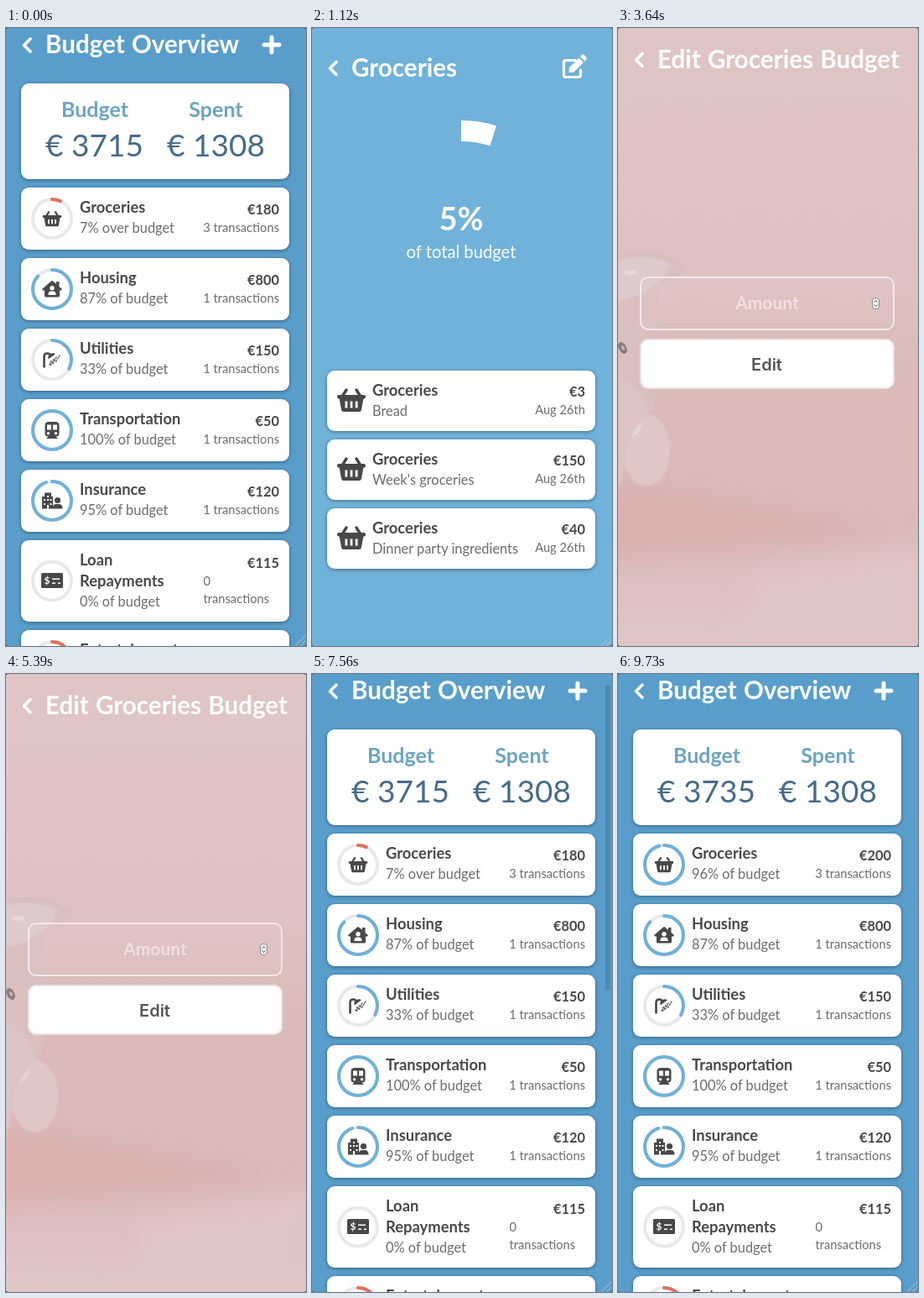
An HTML page that plays this animation: 358x736 px, repeating every 9800 ms.

```html
<!DOCTYPE html>
<html lang="en">
<head>
<meta charset="utf-8">
<title>Budget</title>
<style>
  html, body { margin: 0; width: 100%; height: 100%; overflow: hidden; background: #4b5a66; }
  svg { display: block; width: 358px; height: 736px; border-radius: 3px; }
  text { font-family: Lato, "Open Sans", sans-serif; }
  .title { font-size: 29.6px; font-weight: 700; fill: #fff; word-spacing: 1px; }
  .head { font-size: 25px; font-weight: 700; fill: #6ba4c3; }
  .sum { font-size: 37px; fill: #466b8b; }
  .name { font-size: 18.4px; font-weight: 700; fill: #484848; }
  .sub { font-size: 16.4px; fill: #6c6c6c; }
  .amt { font-size: 16.4px; font-weight: 700; fill: #484848; }
  .note { font-size: 14.7px; fill: #6c6c6c; }
  .pct { font-size: 38px; font-weight: 700; fill: #fff; }
  .total { font-size: 20.2px; fill: #fff; }
  .field { font-size: 21px; font-weight: 700; fill: #fff; }
  .btn { font: 600 20px Inter, sans-serif; fill: #565656; }
  .mid { text-anchor: middle; }
  .end { text-anchor: end; }
  .card { fill: #fff; filter: drop-shadow(0 1px 2px rgba(0, 0, 0, .4)); }
  .line { fill: none; stroke-linecap: round; stroke-linejoin: round; }
  .ring { fill: none; stroke-width: 4; }
  .icon { fill: #484848; stroke: none; }
  .icon .s { fill: none; stroke: #484848; stroke-linecap: round; }
  .icon .w { fill: #fff; }
</style>
</head>
<body>
<svg id="stage" viewBox="0 0 358 736" xmlns="http://www.w3.org/2000/svg"></svg>
<script>
const LOOP = 9800;
const BLUE = '#70b1d8', RED = '#e0705c';

const text = (x, y, cls, str, id = '') =>
  `<text x="${x}" y="${y}" class="${cls}"${id && ` id="${id}"`}>${str}</text>`;
const rect = (x, y, w, h, rx = 0, attrs = '') =>
  `<rect x="${x}" y="${y}" width="${w}" height="${h}" rx="${rx}" ${attrs}/>`;
const card = (y, h) => rect(18, y, 320, h, 9, 'class="card"');
const line = (d, width, color = '#fff') =>
  `<path class="line" d="${d}" stroke="${color}" stroke-width="${width}"/>`;
const icon = (name, x, y, scale = 1) =>
  `<g class="icon" transform="translate(${x} ${y}) scale(${scale})">${icons[name]}</g>`;
const header = (y, title) =>
  line(`M29 ${y - 7}l-7.5 7.5 7.5 7.5`, 3.6) + text(47, y + 10, 'title', title);
const grip = line('M346 735l11-11M352 735l5-5', 1, '#b9c3ca');

const icons = {
  basket: `<path class="s" stroke-width="3.4" d="M-6-12l-5 8M6-12l5 8"/>
    <rect x="-17" y="-6" width="34" height="4.6" rx="2"/>
    <path d="M-14.5-2h29l-2.6 14q-.4 2-2.4 2h-19q-2 0-2.4-2z"/>
    <path class="w" d="M-7.5 1.5h2.8v8h-2.8zM-1.4 1.5h2.8v8h-2.8zM4.7 1.5h2.8v8h-2.8z"/>`,
  house: `<path d="M-12 0L-1-9.6q1-.8 2 0L5-6.2V-9h3.5v6L12 0l-1 1.6H9V8q0 1.5-1.5 1.5h-15Q-9 9.5-9 8V1.6h-2z"/>
    <circle class="w" cy="-1.2" r="2.7"/><path class="w" d="M-4.6 7q0-4.4 3.4-4.4h2.4Q4.6 2.6 4.6 7z"/>`,
  shower: `<path class="s" stroke-width="2.6" d="M-9.5 8.5v-12q0-4 3.7-4 2.6 0 3.6 2.4"/>
    <path d="M-4.5-.5q-1-5 3-6.8 3-1.2 5.5.5z"/>
    <path class="s" stroke-width="1.3" stroke-dasharray="1.6 1.8" d="M-1 1.5L-3 6M2-.5l-3.5 7M5-3L1 5M9-5L4 3"/>`,
  train: `<path d="M-8.5-6q0-4 5-4h7q5 0 5 4V4q0 3.5-4 3.5L7 10H-7l2.5-2.5q-4 0-4-3.5z"/>
    <path class="w" d="M-6-6.5h5v6h-5zM1-6.5h5v6H1z"/>
    <circle class="w" cx="-4.5" cy="3.7" r="1.7"/><circle class="w" cx="4.5" cy="3.7" r="1.7"/>`,
  office: `<path d="M-12-5h3v-4.5h8V-5h2V9.5h-13z"/>
    <path class="w" d="M-10-2h2v2h-2zM-6-6h2v2h-2zM-6-2h2v2h-2zM-2.5-2h2v2h-2zM-10 3h2v2h-2zM-2.5 3h2v2h-2zM-6 5h2v4.5h-2z"/>
    <circle cx="6.5" cy="-.5" r="3.6"/><path d="M.5 9.5q0-5.5 4.5-5.5h3q4.5 0 4.5 5.5z"/>`,
  check: `<rect x="-13" y="-9" width="26" height="18" rx="1.5"/>
    <path class="w" d="M0-2.5H9v1.5H0zM0 2.5H4v1.5H0zM7 2.5h3v1.5H7z"/>
    <text class="w" x="-9.5" y="4" font-size="12" font-weight="700">$</text>`
};

const ring = (y, value, color, id = '') => {
  const at = `class="ring" cx="55" cy="${y}" r="23"`;
  return `<circle ${at} stroke="#e9e9e9"/>` + (value ? `<circle ${at} id="${id}" pathLength="100"
    stroke="${color}" stroke-linecap="round" stroke-dasharray="100"
    stroke-dashoffset="${100 - value}" transform="rotate(-90 55 ${y})"/>` : '');
};

const row = (y, symbol, scale, name, value, sub, amount, count, id = '') =>
  card(y, 74) + ring(y + 37, value, id ? RED : BLUE, id && id + 'Ring') +
  icon(symbol, 55, y + 37, scale) +
  text(88, y + 30, 'name', name) + text(88, y + 54, 'sub', sub, id && id + 'Sub') +
  text(326, y + 32, 'amt end', amount, id && id + 'Amt') +
  text(326, y + 53, 'note end', count + ' transactions');

const overview = () => rect(0, 0, 358, 736, 0, 'fill="#599ecb"') +
  header(20, 'Budget Overview') + line('M308 20h18M317 11v18', 5) +
  card(66, 114) +
  text(106, 106, 'head mid', 'Budget') + text(250.5, 106, 'head mid', 'Spent') +
  text(105.5, 153, 'sum mid', '€ 3715', 'budget') + text(250.5, 153, 'sum mid', '€ 1308') +
  row(190, 'basket', .66, 'Groceries', 7, '7% over budget', '€180', 3, 'food') +
  row(274, 'house', 1, 'Housing', 87, '87% of budget', '€800', 1) +
  row(358, 'shower', 1, 'Utilities', 33, '33% of budget', '€150', 1) +
  row(442, 'train', 1, 'Transportation', 100, '100% of budget', '€50', 1) +
  row(526, 'office', 1, 'Insurance', 95, '95% of budget', '€120', 1) +
  card(610, 97) + ring(658.5, 0) + icon('check', 55, 658) +
  text(88, 640, 'name', 'Loan') + text(88, 665, 'name', 'Repayments') +
  text(88, 689, 'sub', '0% of budget') + text(326, 643, 'amt end', '€115') +
  text(235.5, 664, 'note', '0') + text(235.5, 685, 'note', 'transactions') +
  card(717, 74) + ring(754, 25, RED) + text(88, 747, 'name', 'Entertainment') +
  rect(350, 13, 6, 364, 3, 'id="thumb" fill="#000" fill-opacity=".13"') + grip;

const slice = (cx, cy, outer, inner, deg) => {
  const a = deg * Math.PI / 180;
  const at = r => `${cx + r * Math.sin(a)} ${cy - r * Math.cos(a)}`;
  return `<path fill="#fff" d="M${cx} ${cy - outer}A${outer} ${outer} 0 0 1 ${at(outer)}
    L${at(inner)}A${inner} ${inner} 0 0 0 ${cx} ${cy - inner}z"/>`;
};

const purchase = (y, what, amount) => card(y, 72) + icon('basket', 47, y + 35) +
  text(72, y + 30, 'name', 'Groceries') + text(72, y + 54, 'sub', what) +
  text(326, y + 31, 'amt end', amount) + text(326, y + 52, 'note end', 'Aug 26th');

const pencil = line('M314 38.5h-11q-2.5 0-2.5 2.5v15q0 2.5 2.5 2.5h15q2.5 0 2.5-2.5v-6', 3.2) +
  `<path fill="#fff" d="M307 47l11.5-11.5 5.5 5.5L312.5 52.5l-6 .8zM320 34l1.8-1.8q1.7-1.2 3.2 0l2.3 2.3q1.3 1.5 0 3.2L325.5 39.5z"/>`;

const category = () => rect(0, 0, 358, 736, 0, 'fill="#70b2d9"') +
  header(47.5, 'Groceries') + pencil + slice(178, 250, 140, 115, 17.44) +
  text(178, 241, 'pct mid', '5%') + text(178, 274, 'total mid', 'of total budget') +
  purchase(408, 'Bread', '€3') + purchase(490, "Week's groceries", '€150') +
  purchase(572, 'Dinner party ingredients', '€40') + grip;

const photo = `<defs>
    <linearGradient id="wall" x2="0" y2="1">
      <stop offset="0" stop-color="#dfc5c5"/><stop offset=".38" stop-color="#dec2c1"/>
      <stop offset=".55" stop-color="#dabbb8"/><stop offset=".8" stop-color="#d9bab8"/>
      <stop offset="1" stop-color="#dfc6c6"/>
    </linearGradient>
    <filter id="soft" x="-20%" y="-40%" width="140%" height="180%"><feGaussianBlur stdDeviation="12"/></filter>
    <filter id="edge"><feGaussianBlur stdDeviation="1"/></filter>
  </defs>` + rect(0, 0, 358, 736, 0, 'fill="url(#wall)"') +
  `<g filter="url(#soft)">
    <path fill="#dbafad" fill-opacity=".85" d="M-20 545L60 545Q150 565 330 598Q200 618 -20 635z"/>
    <path fill="#dfc5c4" d="M370 618L150 655Q180 690 130 736H370z"/>
  </g>
  <g filter="url(#edge)">
    <path fill="#d9bfbe" d="M0 268Q60 260 82 285Q75 300 45 306Q60 400 38 460Q30 480 0 480z"/>
    <path fill="#ddcaca" d="M0 276Q30 268 62 280Q58 305 15 322L0 326z"/>
    <ellipse cx="34" cy="503" rx="28" ry="43" fill="#dfc7c6"/>
    <path fill="#dcc4c4" d="M0 415Q28 425 36 460Q10 475 4 540L0 545z"/>
    <ellipse cx="15" cy="291" rx="8" ry="2.5" fill="#e8dddd"/>
    <path fill="#e6d9d9" d="M16 488Q20 476 29 470Q26 482 16 488z"/>
  </g>
  <ellipse cx="5.5" cy="381" rx="4.5" ry="7.5" transform="rotate(-28 5.5 381)" fill="#8a7b7c"/>
  <ellipse cx="6" cy="381" rx="1.7" ry="3" transform="rotate(-28 6 381)" fill="#cbbcbc"/>`;

const editor = () => photo + header(37.5, 'Edit Groceries Budget') +
  rect(27, 297, 302, 62, 9, 'fill="#fff" fill-opacity=".04" stroke="#f3e9e8" stroke-width="2"') +
  text(178, 335, 'field mid', 'Amount', 'hint') + text(172.5, 335, 'field mid', '', 'value') +
  rect(172, 313, 1, 30, 0, 'id="caret" fill="#fff"') +
  rect(303.5, 321.5, 8, 13, 3.5, 'fill="#fff" stroke="#8d8383" stroke-width="1"') +
  line('M305.8 326.3l1.7-2 1.7 2M305.8 329.7l1.7 2 1.7-2', 1, '#444') +
  rect(27, 371, 302, 58, 9, 'fill="#fff" stroke="#ece4e3" stroke-width="2"') +
  text(177.5, 408, 'btn mid', 'Edit');

const pages = { overview, category, editor };
document.getElementById('stage').innerHTML = Object.entries(pages)
  .map(([id, draw]) => `<g id="${id}">${draw()}</g>`).join('');

const el = id => document.getElementById(id);
const set = (id, attrs) => {
  for (const key in attrs) el(id).setAttribute(key, attrs[key]);
};
const put = (id, str) => { if (el(id).textContent !== str) el(id).textContent = str; };
el('hint').style.fill = '#f0dfde';

// Each track is a list of [start time, value] steps.
const SAVED = 8540;
const tracks = {
  page: [[0, 'overview'], [1120, 'category'], [3640, 'editor'], [7560, 'overview']],
  value: [[0, ''], [6020, '2'], [6370, '20'], [6510, '200']],
  caret: [[0, 0], [4830, 1], [5390, 0], [6020, 1], [6580, 0], [7210, 1]]
};
const at = (track, t) => tracks[track].filter(([start]) => start <= t).pop()[1];

// Paused animations, placed by the shared clock.
const motions = [
  el('foodRing').animate({ strokeDashoffset: [93, 4] },
    { delay: SAVED, duration: 500, easing: 'ease', fill: 'both' }),
  el('thumb').animate({ opacity: [1, 0] }, { delay: 8050, duration: 140, fill: 'both' })
];
motions.forEach(m => m.pause());

function render(t) {
  const page = at('page', t), value = at('value', t);
  for (const id in pages) el(id).style.display = id === page ? '' : 'none';

  put('value', value);
  el('hint').style.display = value ? 'none' : '';
  set('caret', { x: Math.round(172 + value.length * 6.2), opacity: at('caret', t) });

  const saved = t >= SAVED;
  put('budget', saved ? '€ 3735' : '€ 3715');
  put('foodAmt', saved ? '€200' : '€180');
  put('foodSub', saved ? '96% of budget' : '7% over budget');
  set('foodRing', { stroke: saved ? BLUE : RED });
  el('thumb').style.display = t < 7560 ? 'none' : '';
  motions.forEach(m => { m.currentTime = t; });
}

const origin = performance.now();
function tick(now) {
  render(Math.max(0, now - origin) % LOOP);
  requestAnimationFrame(tick);
}
render(0);
requestAnimationFrame(tick);
</script>
</body>
</html>
```
